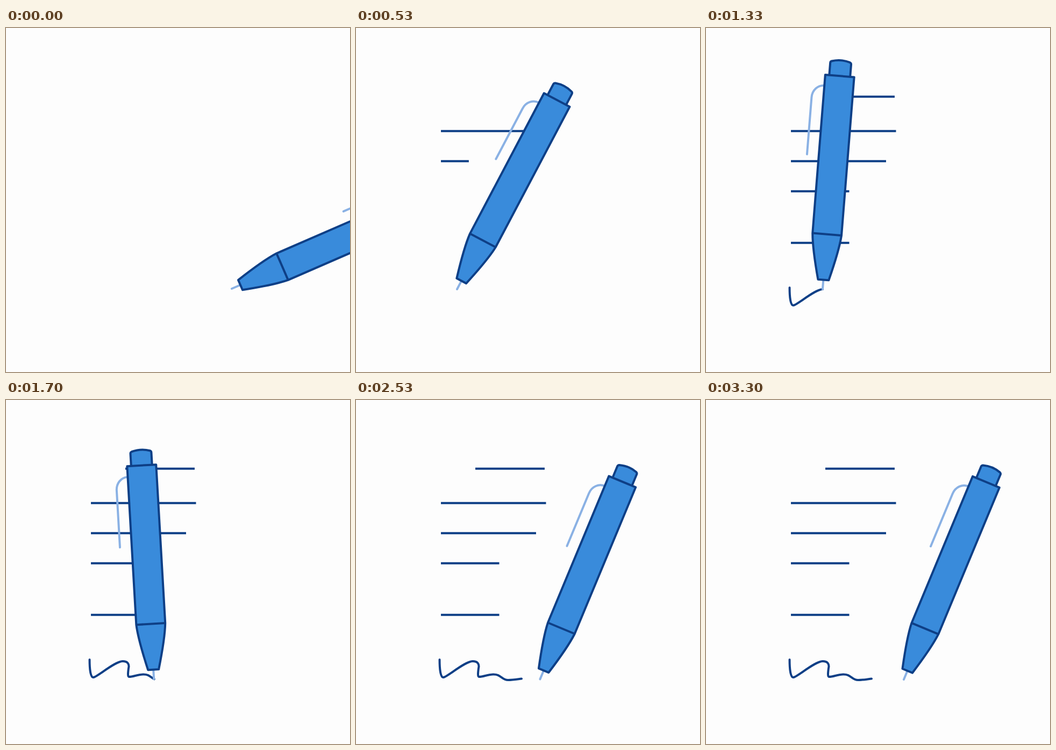
Animation, 640 px wide and 640 px high, one loop 3.33 s. Source, as an HTML page:

```html
<!DOCTYPE html>
<html lang="en">
<head>
<meta charset="utf-8">
<title>Signing pen</title>
<style>
  html, body { margin: 0; width: 100%; height: 100%; overflow: hidden; background: #fdfdfd; }
  svg { display: block; width: 100vw; height: 100vh; }
  path { fill: none; stroke: #0e3f86; stroke-width: 4; stroke-linejoin: round; }
  .round { stroke-linecap: round; }
  .metal { stroke: #8ab1e4; stroke-linecap: round; }
  .body { fill: #398bdb; }
</style>
</head>
<body>
<svg viewBox="0 0 640 640">
  <g id="lines"></g>
  <path id="signature" class="round" d="M155.5 483C155.5 500 157 517 163 516C170 515 203 486 217 486C226 486 230 491 228 499C227 507 226 515 229 515C237 515 244 511 255 510.5C270 510 271 521 283 521C292 521 300 519.5 308 518.5"/>
  <!-- Pen with its writing point at the origin -->
  <g id="pen">
    <path class="metal" d="M0 -17V0M-27 -378C-39 -378 -49 -368 -49 -354V-248"/>
    <path class="body" d="M-19.5 -398V-421Q-19.5 -423.5 -17 -424.5Q0 -430 17 -424.5Q19.5 -423.5 19.5 -421V-398"/>
    <path class="body" d="M-27 -398H27V-102.6Q25 -75 10 -17.5H-10Q-25 -75 -27 -102.6Z"/>
    <path d="M-27 -102.6H27"/>
  </g>
</svg>
<script>
const LOOP = 3330;
const WRITE_START = 728, WRITE_END = 2020;
const $ = id => document.getElementById(id);
const signature = $('signature');
const length = signature.getTotalLength();

// Text lines in writing order: left, right, y
const lines = [
  [158, 353.5, 191.7], [158, 335, 247.7], [158, 266.5, 303.7], [222, 351, 127.7], [158, 266.5, 399.7]
].map(([left, right, y]) => {
  const path = document.createElementNS('http://www.w3.org/2000/svg', 'path');
  $('lines').append(path);
  return { path, left, right, y };
});

const mix = (a, b, p) => a + (b - a) * p;
function ease(t, start, end) {
  const u = Math.min(1, Math.max(0, (t - start) / (end - start)));
  return u * u * (3 - 2 * u);
}

function penAngle(t) {
  if (t < 1050) return mix(66.5, 19.1, ease(t, 0, 731));
  if (t < 1550) return mix(19.1, -5.4, ease(t, 1050, 1550));
  return mix(-5.4, 22.6, ease(t, 1550, 2450));
}

function penTip(t, written) {
  if (t < WRITE_START) {
    const p = ease(t, 0, 680);
    return [mix(420, 155.5, p), mix(485, 483, p) + 25 * p * (1 - p)];
  }
  const point = signature.getPointAtLength(written);
  const away = ease(t, 2007, 2960);
  return [point.x + 60 * away, point.y + 1.5 * away];
}

function draw(t) {
  lines.forEach(({ path, left, right, y }, i) => {
    const start = 368 + 120 * i;
    const p = ease(t, start, start + 120);
    path.setAttribute('d', p ? `M${left} ${y}H${mix(left, right, p)}` : '');
  });

  const written = length * ease(t, WRITE_START, WRITE_END);
  signature.style.visibility = written ? 'visible' : 'hidden';
  signature.style.strokeDasharray = `${written} ${length + 10}`;

  $('pen').setAttribute('transform', `translate(${penTip(t, written)}) rotate(${penAngle(t)})`);
}

function tick() {
  draw(performance.now() % LOOP);
  requestAnimationFrame(tick);
}
tick();
</script>
</body>
</html>
```
